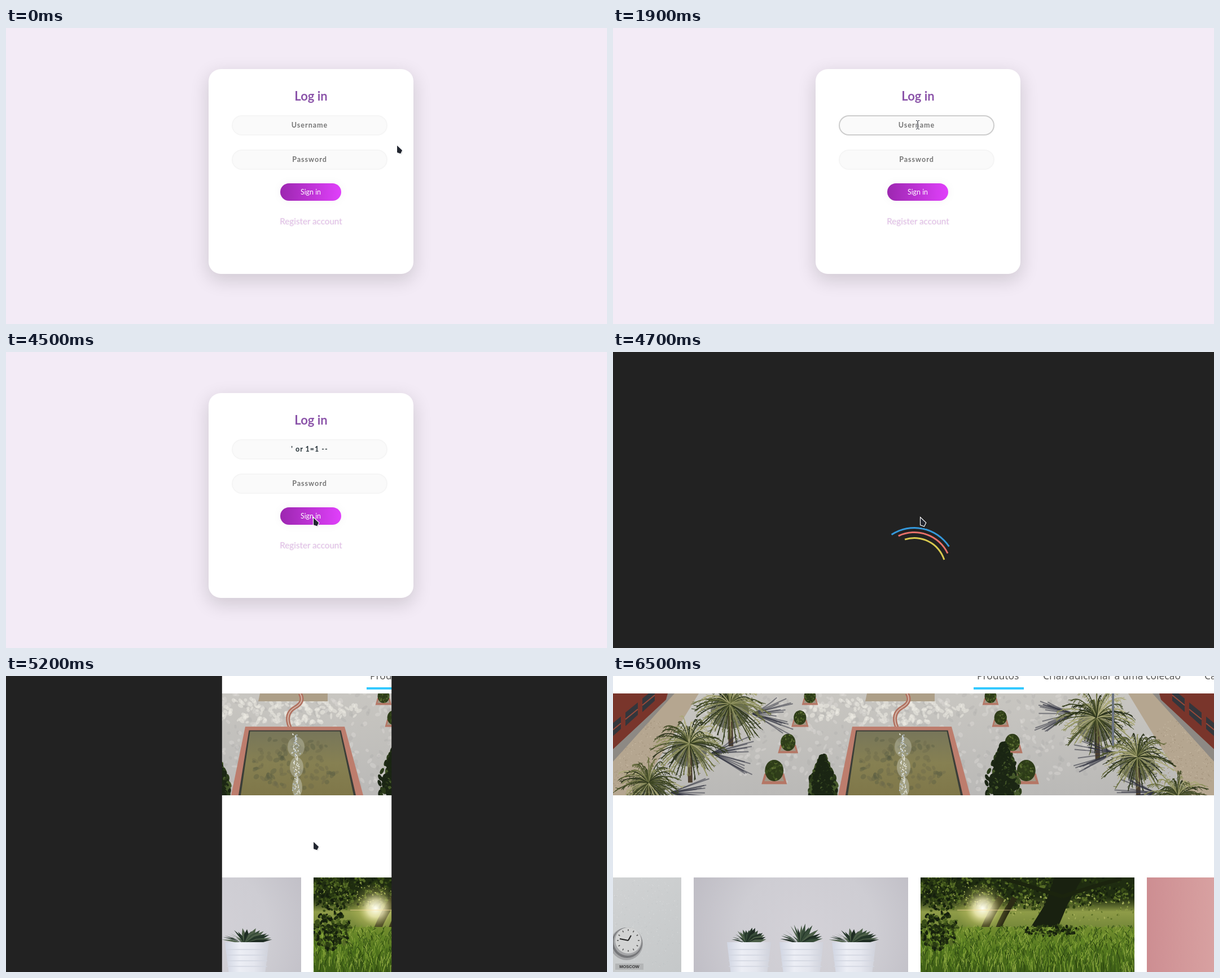
Recreate the animation shown at these times as an HTML page with a canvas. Size 1065 by 526 pixels, loop 8.7 s.

```html
<!DOCTYPE html>
<html lang="en">
<head>
<meta charset="utf-8">
<title>Log in</title>
<style>
html, body { margin: 0; width: 100%; height: 100%; overflow: hidden; }
#stage { position: relative; width: 1065px; height: 526px; overflow: hidden; background: #fff; }
#stage * { position: absolute; box-sizing: border-box; }
.fill { left: 0; top: 0; width: 1065px; height: 526px; }

#login { background: #f3ebf6; font-family: Lato, "Open Sans", sans-serif; }
.card { left: 359px; top: 73px; width: 363px; height: 364px; border-radius: 21.6px;
  background: #fff; box-shadow: 0 10px 32px 2px rgba(0,0,0,.14); }
.mid { left: 440px; width: 201px; text-align: center; line-height: 30px; white-space: pre; }
.title { top: 106px; font-size: 22px; font-weight: 700; color: #8c55aa; }
.field { left: 400px; width: 276px; height: 36px; border-radius: 18px; line-height: 32px;
  border: 2px solid rgba(0,0,0,.02); background: rgba(136,126,126,.04);
  text-align: center; font-size: 12.6px; font-weight: 700; letter-spacing: .95px; color: #757575; white-space: pre; }
#user { top: 154.5px; }
#pass { top: 215.5px; }
#caret { top: 165px; width: 1px; height: 15px; background: #263238; }
.button { left: 486px; top: 276px; width: 108px; height: 31px; border-radius: 16px; text-align: center;
  line-height: 32px; font-size: 12.4px; color: #fff; background: linear-gradient(to right, #9c27b0, #e040fb);
  box-shadow: 0 0 18px 1px rgba(0,0,0,.04); }
.link { top: 328px; font-size: 15.2px; color: #e1bee7; text-shadow: 0 0 3px rgba(117,117,117,.12); }

#shop { font: 17.4px/20px "Noto Sans", "Open Sans", sans-serif; color: #5a5a5a; }
#shop span { top: -11px; white-space: pre; }
.bar { left: 639px; top: 20px; width: 89px; height: 3.5px; background: #33c9ff; }
#shop .tag { left: 4px; top: 511px; width: 50px; text-align: center;
  font: bold 7.5px/11px "Liberation Sans", Arial, sans-serif; color: #333; background: #b3b5b6; }

.door { top: 0; width: 533px; height: 526px; background: #222; }
#left { left: 0; }
#right { left: 533px; }
.ring { border: 3px solid transparent; border-radius: 50%; }
#blue { left: 458.5px; top: 311px; width: 150px; height: 150px; border-top-color: #3498db; }
#red { inset: 5px; border-top-color: #e9716a; }
#gold { inset: 15px; border-top-color: #d9c94f; }
#mouse { left: 0; top: 0; overflow: visible; }
</style>
</head>
<body>
<div id="stage">
  <div id="shop" class="fill">
    <canvas id="photos" class="fill" width="1065" height="526"></canvas>
    <span style="left:645px">Produtos</span>
    <span style="left:762px">Criar/adicionar a uma colecao</span>
    <span style="left:1048px">Ca</span>
    <div class="bar"></div>
    <div class="tag">MOSCOW</div>
  </div>
  <div id="left" class="door"></div>
  <div id="right" class="door"></div>
  <div id="blue" class="ring"><div id="red" class="ring"></div><div id="gold" class="ring"></div></div>
  <div id="login" class="fill">
    <div class="card"></div>
    <div class="mid title">Log in</div>
    <div id="user" class="field"></div>
    <div id="pass" class="field">Password</div>
    <div id="caret"></div>
    <div class="button">Sign in</div>
    <div class="mid link">Register account</div>
  </div>
  <svg id="mouse" width="20" height="20">
    <g id="arrow">
      <path d="M1.5 2.5 11.5 12 8.5 18 1 16Z" fill="#000" opacity=".18"/>
      <path d="M.5 .5 10.8 10.3 7.5 17 .5 14.5Z" fill="#222630" stroke="#fff" stroke-width="1.1"/>
    </g>
    <g id="beam" fill="none">
      <path d="M-3-7.5H3M-3 7.5H3M0-7.5V7.5" stroke="#fff" stroke-width="3"/>
      <path d="M-3-7.5H-.8M.8-7.5H3M-3 7.5H-.8M.8 7.5H3M0-7V7" stroke="#222630" stroke-width="1.2"/>
    </g>
  </svg>
</div>
<script>
const $ = id => document.getElementById(id);
const g = $('photos').getContext('2d');

let seed = 7;
const rnd = (a = 0, b = 1) => {
  seed = (seed * 1664525 + 1013904223) % 4294967296;
  return a + (b - a) * seed / 4294967296;
};
const pick = list => list[Math.floor(rnd(0, list.length))];

function poly(fill, ...p) {
  g.fillStyle = fill;
  g.beginPath();
  for (let i = 0; i < p.length; i += 2) g.lineTo(p[i], p[i + 1]);
  g.fill();
}
function oval(fill, x, y, rx, ry = rx, turn = 0) {
  g.fillStyle = fill;
  g.beginPath();
  g.ellipse(x, y, rx, ry, turn, 0, 7);
  g.fill();
}
function line(color, width, x, y, ex, ey, cx = (x + ex) / 2, cy = (y + ey) / 2) {
  g.strokeStyle = color;
  g.lineWidth = width;
  g.beginPath();
  g.moveTo(x, y);
  g.quadraticCurveTo(cx, cy, ex, ey);
  g.stroke();
}
function fade(gradient, colors) {
  colors.forEach((c, i) => gradient.addColorStop(i / (colors.length - 1), c));
  return gradient;
}
const shade = (x0, y0, x1, y1, ...colors) => fade(g.createLinearGradient(x0, y0, x1, y1), colors);
const glow = (x, y, r, ...colors) => fade(g.createRadialGradient(x, y, 0, x, y, r), colors);

function photo(x, y, w, h, fill, paint) {
  g.save();
  g.beginPath();
  g.rect(x, y, w, h);
  g.clip();
  g.fillStyle = fill;
  g.fillRect(x, y, w, h);
  if (paint) paint();
  g.restore();
}
// Small leaves or stains scattered inside an ellipse
function cloud(x, y, rx, ry, n, size, colors) {
  for (let i = 0; i < n; i++) {
    const a = rnd(0, 6.3), r = Math.sqrt(rnd());
    oval(pick(colors), x + Math.cos(a) * r * rx, y + Math.sin(a) * r * ry, rnd(.4, 1) * size, rnd(.3, .7) * size, rnd(0, 3));
  }
}

const FROND = ['#2b331b', '#474f29', '#6a6f40', '#8f915f', '#aaa878', '#3a4322'];
const HEDGE = ['#1b2614', '#2b3b1a', '#45582a'];

function palm(x, y, r) {
  oval('rgba(40,46,28,.55)', x, y + r * .2, r * .5, r * .45);
  line('#4d4030', r / 8, x, y, x + 2, y + r * 1.1);
  for (let i = 0; i < 60; i++) {
    const a = i * 2.4, l = r * rnd(.6, 1.1);
    const ex = x + Math.cos(a) * l, ey = y + Math.sin(a) * l * .85 + r * .15;
    const cx = x + Math.cos(a) * l * .6, cy = y + Math.sin(a) * l * .7 - r * .15;
    const color = pick(FROND);
    line(color, r / 40, x, y, ex, ey, cx, cy);
    for (let k = .3; k < 1; k += .07) {
      const px = x + 2 * k * (1 - k) * (cx - x) + k * k * (ex - x);
      const py = y + 2 * k * (1 - k) * (cy - y) + k * k * (ey - y);
      line(color, 1, px, py, px + Math.cos(a) * r * .1 + rnd(-3, 3), py + r * rnd(-.04, .13));
    }
  }
}
function shadow(x, y, dir) {
  for (let i = 0; i < 18; i++) {
    const a = rnd(-.6, .8);
    line('rgba(52,54,66,.55)', 2, x, y, x + dir * rnd(40, 75), y + a * 50, x + dir * 25, y + a * 20);
  }
}
function bush(x, y, r) {
  poly('#b57766', x - r, y + r * .3, x + r, y + r * .3, x + r * 1.3, y + r * 1.4, x - r * 1.3, y + r * 1.4);
  poly('#a39786', x - r * .8, y + r * .5, x + r * .8, y + r * .5, x + r, y + r * 1.1, x - r, y + r * 1.1);
  oval('#2f3d1a', x, y, r * .95, r * 1.1);
  cloud(x, y, r * .85, r, 40, r / 5, ['#3c4f20', '#5a6c31', '#2b3b15']);
}
function cypress(x, top, w) {
  for (let k = 0; k < 1; k += .005) {
    const half = w * Math.min(1, .15 + k * 1.5);
    oval(pick(HEDGE), x + rnd(-half, half), top + k * (214 - top), 3, 6, rnd(-.5, .5));
    oval(HEDGE[0], x + rnd(-half, half) * .7, top + k * (214 - top), 5, 7);
  }
}
// Brick building and gravel roof on the left edge
function wing() {
  poly('#b5a690', 0, 31, 152, 31, 42, 212, 0, 212);
  cloud(45, 140, 70, 70, 500, 1.3, ['#c6b8a2', '#a3937c']);
  poly('#8d8984', 97, 31, 109, 31, 0, 152, 0, 128);
  poly('#79352b', 0, 31, 97, 31, 94, 42, 0, 130);
  for (let i = 0; i < 3; i++) {
    const x = i * 30 - 8, y = 90 - i * 25;
    poly('#33363c', x, y, x + 22, y - 18, x + 22, y + 4, x, y + 24);
    line('#9a4a3a', 2, x, y + 12, x + 22, y - 6);
  }
}
// Pool edge: each inset gives a smaller trapezoid
function basin(fill, inset) {
  poly(fill, 424 + inset / 2, 90 + inset / 2, 600 - inset / 2, 90 + inset / 2, 633 - inset, 212, 399 + inset, 212);
}

function plaza() {
  cloud(533, 110, 420, 95, 600, 6, ['rgba(232,230,224,.3)', 'rgba(160,161,161,.2)']);
  cloud(480, 62, 150, 24, 160, 6, ['rgba(240,237,230,.5)']);
  wing();
  g.save();
  g.translate(1065, 0);
  g.scale(-1, 1);
  wing();
  g.restore();
  poly('#ad9f88', 450, 31, 570, 31, 570, 45, 447, 45);
  [['#b0705f', 7], ['#d3b6a8', 2]].forEach(([c, w]) => {
    line(c, w, 521, 31, 512, 56, 530, 46);
    line(c, w, 512, 56, 503, 91, 493, 67);
  });
  basin('#bd7d6d', 0);
  basin('#3b3e38', 13);
  basin(shade(0, 97, 0, 212, '#77765a', '#868052', '#7f7749'), 17);
  cloud(512, 155, 80, 52, 90, 7, ['rgba(84,90,66,.35)', 'rgba(108,106,74,.4)']);
  for (let i = 0; i < 3; i++) oval(`rgba(205,208,198,${.35 + i * .05})`, 514 + i, 126 + i * 36, 15 - i * 3, 18);
  for (let y = 103; y < 211; y++) {
    const w = 2 + y % 35 / 6;
    oval(pick(['#e8eae5', '#b8c3cf', '#d4d2bd']), 514 + rnd(-w, w), y, 1, 1.3);
  }
  // Two rows of planting that spread towards the viewer
  for (const side of [-1, 1]) {
    for (let i = 0; i < 4; i++) bush(509 + side * (160 + 16 * i + 1.7 * i * i), 36 + 35 * i + 3 * i * i, 11 + i * i * .7);
    cypress(532 + side * 160, 134 - side * 11, 27 + side * 3);
    for (let i = 0; i < 3; i++) {
      const x = 532 + side * (325 + 72 * i), y = 62 + 70 * i;
      shadow(x - side * 40, y + 5, -side);
      palm(x, y - (side < 0 ? 12 : -12), 68 - i * 5);
    }
  }
  line('#6c7482', 4, 886, 31, 886, 124);
}

function clock() {
  cloud(50, 440, 75, 90, 300, 1, ['rgba(255,255,255,.3)', 'rgba(130,140,145,.15)']);
  ['#a4a5a7', '#757679', '#a5a6a8', '#d2d3d3'].forEach((c, i) => oval(c, 24 + i, 476 - i * 2, 29 - i * 2));
  for (let i = 0; i < 12; i++) {
    const c = Math.cos(i * Math.PI / 6), s = Math.sin(i * Math.PI / 6);
    line('#555', 1.5, 27 + c * 17, 470 + s * 17, 27 + c * 20, 470 + s * 20);
  }
  line('#222', 2, 27, 470, 12, 467);
  line('#222', 2, 27, 470, 32, 461);
}

function plants() {
  for (let n = 0; n < 3; n++) {
    const x = 241 + n * 93, w = 39, reach = 31 + n * 7, wide = n === 1 ? 3 : 5;
    for (let i = 0; i < 17; i++) {
      const a = -3 + i / 16 * 2.86, ex = x + Math.cos(a) * reach, ey = 471 + Math.sin(a) * (n === 1 ? 33 : 25) * rnd(.7, 1);
      const mx = (x + ex) / 2, my = (473 + ey) / 2;
      poly(pick(['#25372a', '#374c39', '#1e2c23', '#4c5f48']), x - wide, 475, mx - wide, my - 2, ex, ey, mx + wide, my + 3, x + wide, 475);
    }
    poly(shade(x - w, 0, x + w, 0, '#d0d5e2', '#eceef5', '#e4e6ee', '#cfd1da'), x - w, 473, x + w, 473, x + w - 7, 530, x - w + 7, 530);
    for (let y = 486; y < 526; y += 10) line('#d2d6e1', 1.3, x - w + 3, y, x + w - 3, y);
  }
}

function meadow() {
  const dark = ['#151f0d', '#1e2b0f', '#293a12', '#3a4e18', '#566c26'];
  const gaps = ['#8c9b45', '#a9b35c', '#5d7128'];
  g.fillStyle = shade(0, 392, 0, 446, 'rgba(90,105,40,0)', '#8f9c48', '#76883a');
  g.fillRect(545, 392, 380, 56);
  cloud(735, 380, 200, 34, 750, 4, dark);
  cloud(800, 412, 130, 26, 170, 2.5, gaps);
  cloud(620, 390, 70, 24, 110, 2, gaps);
  for (let i = 0; i < 2; i++) line('#2b2b14', 13 - i * 3, 658 + i * 24, 450, 688 + i * 24, 394, 668 + i * 24, 425);
  poly('#192110', 782, 358, 832, 358, 806, 405, 785, 455, 735, 455, 766, 405);
  for (const side of [-1, 1]) line('#1b240e', 7, 796, 392, 796 + side * 105, 360, 796 + side * 60, 372);
  cloud(580, 385, 38, 36, 220, 4, dark);
  oval(glow(655, 413, 46, '#fffff4', 'rgba(255,248,195,.75)', 'rgba(215,210,115,.25)', 'rgba(200,200,90,0)'), 655, 413, 46);
  line('rgba(255,225,160,.5)', 1.5, 610, 416, 715, 416);
  g.fillStyle = shade(0, 444, 0, 526, '#758f30', '#56791f', '#3c5b15');
  g.fillRect(545, 446, 380, 80);
  for (let i = 0; i < 1500; i++) {
    const k = i / 1500, x = rnd(545, 925), y = 447 + k * 88, h = 5 + k * 15;
    line(pick(['#2c460f', '#44671a', '#5e8424', '#7d9d33', '#92ab45', '#37541a']), 1.1, x, y, x + rnd(-6, 6), y - h, x + rnd(-2, 2), y - h / 2);
  }
  cloud(577, 452, 34, 34, 200, 5, dark);
  cloud(780, 452, 50, 10, 90, 4, dark);
}

photo(0, 31, 1065, 181, shade(0, 31, 0, 212, '#c8c6c1', '#bab9b7'), plaza);
photo(0, 358, 121, 168, shade(0, 358, 121, 526, '#d0d2d3', '#c5c8c9'), clock);
photo(143, 358, 380, 168, glow(345, 455, 240, '#d3d1d7', '#cecdd3', '#bcbac2'), plants);
photo(545, 358, 379, 168, '#1f2c11', meadow);
photo(946, 358, 119, 168, shade(946, 0, 1065, 0, '#cd8e92', '#d8a1a1'));

const LOOP = 8700, TICK = 100, SPIN = 4635;
const HOME = [692, 207];
// Pointer glides: start, end, x, y
const GLIDES = [[450, 800, 540, 172], [1900, 2300, 683, 171], [3300, 3900, 544, 293], [6000, 6500, 190, -20]];
const clamp = v => Math.max(0, Math.min(1, v));
const ease = k => k < .5 ? 4 * k ** 3 : 1 - 4 * (1 - k) ** 3;
const show = (id, on) => { $(id).style.display = on ? '' : 'none'; };
const spin = (id, rate, t) => { $(id).style.transform = `rotate(${rate * t / 1000}deg)`; };

function pointer(t) {
  return GLIDES.reduce(([x, y], [a, b, ex, ey]) => {
    const k = ease(clamp((t - a) / (b - a)));
    return [x + (ex - x) * k, y + (ey - y) * k];
  }, HOME);
}

function draw(t) {
  const [x, y] = pointer(t);
  const form = t < 4700;
  const over = form && x > 400 && x < 676 && (Math.abs(y - 172) < 18 || Math.abs(y - 233) < 18);
  $('mouse').style.transform = `translate(${x}px,${y}px)`;
  show('arrow', !over);
  show('beam', over);

  const focus = t >= 1300 && t < 4500;
  const typed = t >= 2900;
  show('login', form);
  $('user').textContent = typed ? "' or 1=1 --" : 'Username';
  $('user').style.color = typed ? '#263238' : '';
  $('user').style.borderColor = focus ? `rgba(0,0,0,${t < 1400 ? .1 : .18})` : '';
  const since = t - (typed ? 2900 : 1300);
  show('caret', focus && Math.floor(since / 600) % 2 === 0);
  $('caret').style.left = (typed ? 569 : 538) + 'px';

  spin('blue', 180, t - SPIN);
  spin('red', 120, t - SPIN);
  spin('gold', 240, t - SPIN);
  $('blue').style.opacity = clamp((5088 - t) / 140);
  const gap = 533 * ease(clamp((t - 5060) / 339));
  $('left').style.transform = `translateX(${-gap}px)`;
  $('right').style.transform = `translateX(${gap}px)`;
}
function loop() {
  const t = performance.now() % LOOP;
  draw(Math.floor(t / TICK) * TICK);
  requestAnimationFrame(loop);
}
loop();
</script>
</body>
</html>
```
